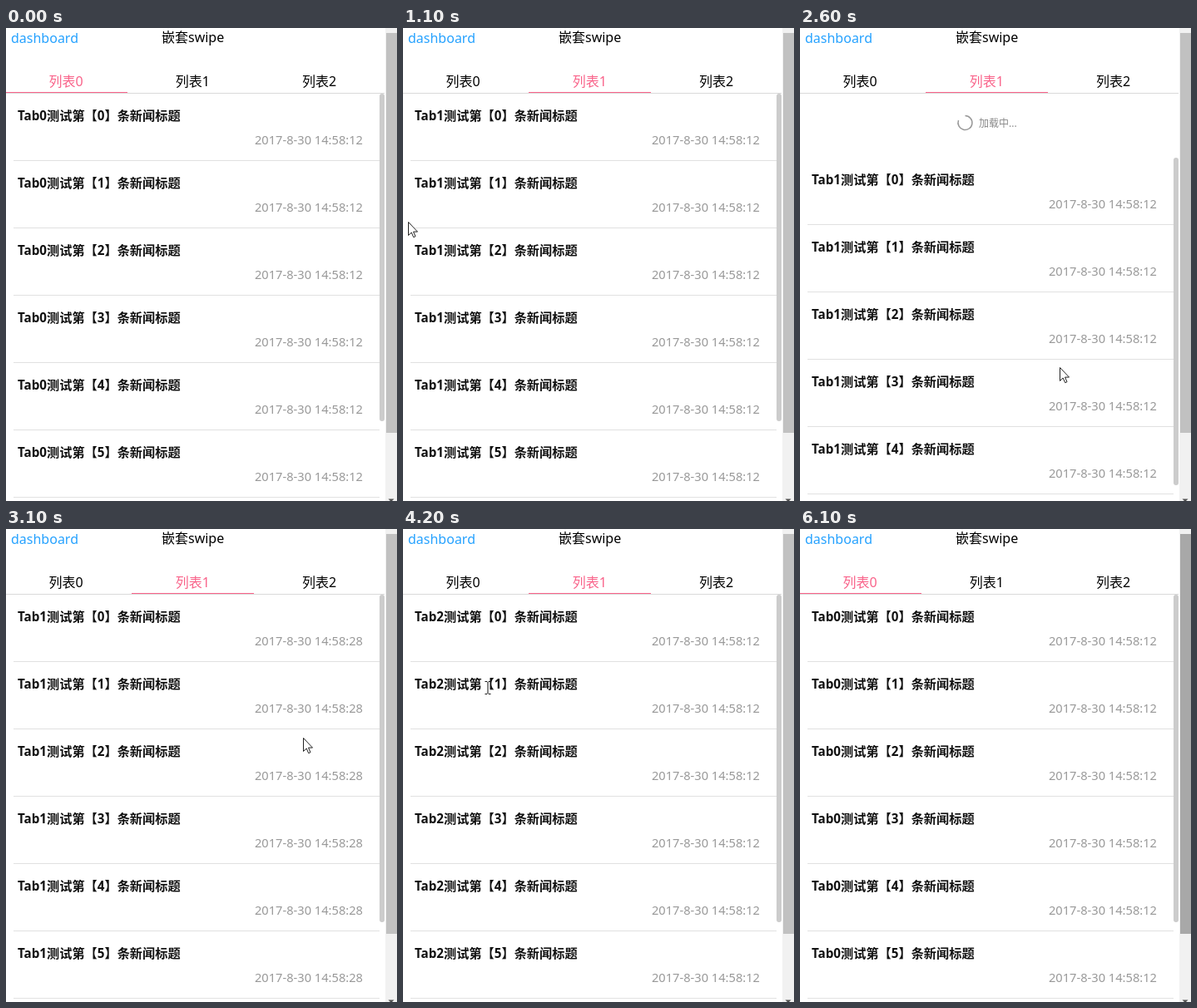
Write an HTML page that moves like this. It is 470 px wide and 569 px high and loops after 7.4 s.

```html
<!DOCTYPE html>
<html lang="zh-CN">
<head>
<meta charset="utf-8">
<title>嵌套swipe</title>
<style>
html, body { margin: 0; width: 100%; height: 100%; overflow: hidden; background: #fff }
svg { display: block }
text { font: 16px "Noto Sans", "Noto Sans CJK SC", "Noto Sans CJK", sans-serif; white-space: pre }
.title { font-size: 15.2px; font-weight: 700; fill: #111 }
.date { font-size: 14.65px; fill: #999 }
.load { font-size: 12px; fill: #888 }
.tab { text-anchor: middle }
.on { fill: #f9638a }
</style>
</head>
<body>
<svg width="470" height="569" viewBox="0 0 470 569">
  <g id="lists"></g>
  <rect width="456" height="79" fill="#fff"/>
  <rect y="78" width="455" height="1" fill="#d9d9d9"/>
  <text x="6" y="18" fill="#26a2ff">dashboard</text>
  <text x="187" y="17">嵌套swipe</text>
  <g id="tabs"></g>
  <rect id="line" class="on" y="77" width="147" height="1"/>
  <rect x="456" width="14" height="569" fill="#f1f1f1"/>
  <rect id="thumb" x="457" y="6" width="13" height="481"/>
  <path d="M459.5 566.5h7l-3.5 3.5z" fill="#505050"/>
  <g id="cursor">
    <path id="arrow" d="M.5.5V16.5L4.2 13 6.7 18.7 9 17.7 6.5 12.1H11.5Z" fill="#fff" stroke="#222"/>
    <path id="beam" d="M-3.5-7.5h2.5l1 1 1-1h2.5M0-6.5V6.5M-3.5 7.5h2.5l1-1 1 1h2.5" fill="none" stroke="#111"/>
  </g>
</svg>
<script>
const LOOP = 7400, STEP = 100, PITCH = 461, ROW = 81;
const $ = id => document.getElementById(id);
const show = (el, on) => el.setAttribute('visibility', on ? 'visible' : 'hidden');
const move = (el, x, y) => el.setAttribute('transform', `translate(${x} ${y})`);

const within = (t, a, b) => t >= a && t < b;
const ramp = (t, a, b) => Math.min(1, Math.max(0, (t - a) / (b - a)));
const easeOut = p => 1 - (1 - p) ** 2;
const smooth = p => p * p * (3 - 2 * p);

// Pointer moves: start, end, x, y reached
const moves = [
  [100, 900, 6, 233], [1100, 1600, 290, 215], [1600, 2200, 312, 408], [2600, 3200, 366, 220],
  [3400, 3900, 116, 208], [3900, 4200, 102, 191], [4200, 5000, 60, 50], [5000, 5200, 120, 86],
  [5200, 5400, 104, 64], [5600, 6100, 480, 220]
];

function pointer(t) {
  let x = 440, y = 250;
  for (const [a, b, toX, toY] of moves) {
    const p = ramp(t, a, b);
    x += (toX - x) * p;
    y += (toY - y) * p;
  }
  return [x, y];
}

// A finger drag of 250px, then a snap to the next list
const drag = (t, a, b) => 250 * ramp(t, a, b) + (PITCH - 250) * easeOut(ramp(t, b, b + 200));
const swipeAt = t => drag(t, 400, 900) + drag(t, 3400, 3900) - 2 * PITCH * smooth(ramp(t, 5567, 5967));
const pullAt = t => 95 * ramp(t, 1600, 2200) - 18 * ramp(t, 2300, 2500) - 77 * easeOut(ramp(t, 2800, 3100));

function listMarkup(tab) {
  let s = `<rect class="press" x="9" y="160" width="440" height="80" fill="#f5f5f5"/>`;
  for (let i = 0; i < 6; i++) {
    const y = 79 + i * ROW;
    s += `<text class="title" x="14" y="${y + 32}">Tab${tab}测试第【${i}】条新闻标题</text>
      <text class="date" x="299" y="${y + 61}">2017-8-30 14:58:12</text>
      <rect x="9" y="${y + 80}" width="440" height="1" fill="#e1e1e1"/>`;
  }
  return `<g>${s}<rect x="449" y="79" width="6" height="394" rx="3" fill="#ccc"/>
    <path class="spin" d="M198.5 28.5A8.5 8.5 0 1 1 190.5 34" fill="none" stroke="#999" stroke-width="1.5"/>
    <text class="load" x="215" y="42">加载中...</text></g>`;
}

$('lists').innerHTML = [0, 1, 2].map(listMarkup).join('');
$('tabs').innerHTML = [0, 1, 2].map(i =>
  `<text class="tab" x="${72 + i * 152.3}" y="70">列表${i}</text>`).join('');

const lists = [...$('lists').children], tabs = [...$('tabs').children];
const dates = lists[1].querySelectorAll('.date');
const spin = lists[1].querySelector('.spin');
const marks = document.querySelectorAll('.press');

function draw(t) {
  const swipe = swipeAt(t), [x, y] = pointer(t);
  lists.forEach((g, i) => move(g, Math.round(i * PITCH - swipe), i === 1 ? Math.round(pullAt(t)) : 0));

  const pressed = within(t, 400, 900) || within(t, 1700, 2400) || within(t, 3500, 3900);
  const active = within(t, 1000, 5600) ? 1 : 0;
  marks.forEach((m, i) => show(m, pressed && i === active));
  tabs.forEach((e, i) => e.classList.toggle('on', i === active));
  $('line').setAttribute('x', active * 152 - 1);

  const time = '2017-8-30 14:58:' + (t >= 2800 ? 28 : 12);
  dates.forEach(d => d.textContent = time);
  spin.setAttribute('transform', `rotate(${(t - 2600) * .45} 198.5 37)`);
  $('thumb').setAttribute('fill', t >= 6100 ? '#a8a8a8' : '#c1c1c1');

  const visible = within(t, 100, 6100), text = within(t, 4100, 4500);
  move($('cursor'), Math.round(x), Math.round(y));
  show($('arrow'), visible && !text);
  show($('beam'), visible && text);
}

const start = performance.now();
function tick() {
  const t = (performance.now() - start) % LOOP;
  draw(Math.floor(t / STEP) * STEP);
  requestAnimationFrame(tick);
}
tick();
</script>
</body>
</html>
```
